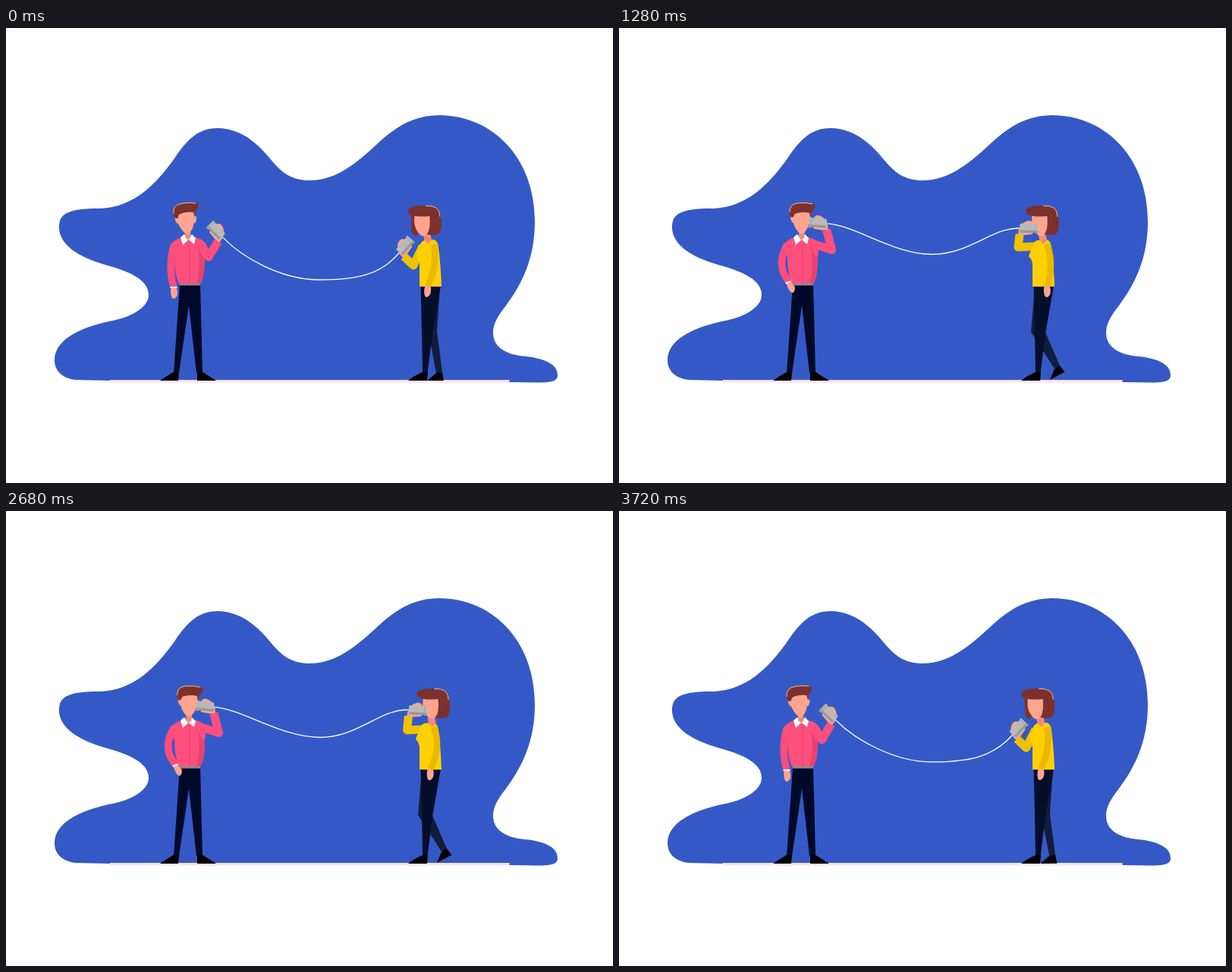
An HTML page for the animation above (3.76 s loop, 800 by 600 pixels).

```html
<!DOCTYPE html>
<html lang="en">
<head>
<meta charset="utf-8">
<title>Tin can telephone</title>
<style>
  html, body { margin: 0; width: 100%; height: 100%; overflow: hidden; background: #fff; }
  svg { display: block; width: 800px; height: 600px; }
  .skin { fill: #ffa48f; }
  .shade { fill: #f08a78; }
  .hair { fill: #7c312d; }
  .shine { fill: none; stroke: #f8cfc6; stroke-width: .9; }
  .pink { fill: #ff4f7d; }
  .yellow { fill: #ffd000; }
  .arm { fill: none; stroke-linejoin: round; }
</style>
</head>
<body>
<svg viewBox="0 0 800 600">
  <defs>
    <g id="can">
      <path class="skin" d="M-6 -5Q-5 -10 0 -10Q6 -9 9 -5L13 0L14 8L6 9L-5 8Z"/>
      <path fill="#b9b9b7" d="M-12 -6.5L-9 -6.5L-9 -6L11 -6Q13 0 11 6L-9 6L-9 7L-12 7Z"/>
      <path fill="#999996" d="M-12 3L12 2.5L11 6L-9 6L-9 7L-12 7Z"/>
      <path fill="none" stroke="#a5a5a2" d="M-9 -6V6"/>
    </g>
    <path id="hand" class="skin" d="M-3.5 0H3.5Q6 6 4.5 11Q1 17 -2 14Q-5 8 -3.5 0Z"/>
  </defs>

  <path fill="#3459c7" d="M70 260C71 240 95 238 125 238C168 236 197 207 222 172C239 146 255 132 278 132
    C315 132 338 160 352 177C365 192 378 201 400 201C435 201 462 178 488 154C512 131 537 115 571 115
    C640 115 697 170 697 255C697 305 679 339 659 366C648 380 642 390 642 402C642 422 661 431 684 433
    C712 436 727 444 727 458C727 466 718 467.5 700 467.5L664 467L137 465L92 464C74 462 64 452 64 438
    C64 412 95 396 135 387C170 381 188 366 188 352C188 332 163 321 130 312C95 302 68 285 70 260Z"/>
  <path fill="#ffe0ee" d="M137 464H663.5V467.5H137Z"/>

  <g id="man">
    <path fill="#000a28" d="M229 338H256L259 455H251L241 366L228 455H221Z"/>
    <path d="M221 453.5L228 454L227 465H203Q210 460 221 453.5ZM252 454L259 453.5Q269 460 277 465H252Z"/>
    <path id="manRestArm" class="arm" stroke="#fb4d7b" stroke-width="9.5"/>
    <g id="manRestHand"><use href="#hand"/><path fill="#fff" d="M-4.5 -1H4.500V1H-4.500Z"/></g>
    <path class="pink" d="M232 276Q219 279 215.500 290L222 302Q222 325 228 337.500H256Q262 328 262 302L264 285Q258 277 249 276Z"/>
    <path fill="#e54371" d="M253 287Q256 300 262 303Q262 328 256 337.500H251Q257 318 253 287Z"/>
    <path fill="none" stroke="#dc3d69" stroke-width=".8" d="M242 284V336"/>
    <path fill="#8e8790" d="M229 336.500H256V339.500H229Z"/>
    <path id="manArm" class="arm" stroke="#ff4f7d" stroke-width="11"/>
    <path fill="#fff" d="M230 276L235 272L240 279L245 272L250 277L248 285L240.500 279L233 286Z"/>
    <g id="manHead">
      <path class="shade" d="M235.500 264L243 264L243.500 276L240 280L236 276Z"/>
      <path class="skin" d="M227 249Q222 248 223 253Q225 259 228 258ZM247 248Q252 247 251 253Q250 258 246 258Z"/>
      <path class="skin" d="M226 242H248Q249 256 246 264Q242 272 238.500 272Q231 268 227 258Z"/>
      <path class="hair" d="M221 248Q217 233 231 231Q245 228 253 231Q255 238 250 241.500Q249 244 249 250L247 243Q236 242 228 246L226 251Q223 252 221 248Z"/>
      <path class="shine" d="M221 245Q219 234 231 231.500Q242 229.500 250 231"/>
    </g>
    <use id="manCan" href="#can"/>
  </g>

  <g id="woman">
    <path id="backLeg" fill="#101d3b"/>
    <path id="backShoe" d="M-4 0L4 -1L6 10H-16Z"/>
    <path fill="#060e2c" d="M546.500 340H573L562.500 400L555.500 455H549Q548 395 546.500 340Z"/>
    <path d="M548.500 454L556 453.500L555 465H530Q537 459 548.500 454Z"/>
    <path id="womanArm" class="arm" stroke="#efc200" stroke-width="11"/>
    <path class="yellow" d="M551 280Q545 283 545 290Q541 296 540 301Q545 306 545 313L545 341H574Q573 312 570 290Q570 282 564 279Z"/>
    <g id="womanRestHand"><use href="#hand"/></g>
    <path id="womanRestArm" class="arm" stroke="#e9b900" stroke-width="8.500"/>
    <path id="womanNeck" class="shade" d="M549 264H558L561 280L556 285L551 279Z"/>
    <g id="womanHead">
      <path id="strand" class="hair" d="M534 244H543V272L540 274Q534 272 534 262Z"/>
      <path class="hair" d="M545 240L556 234Q571 234 572.500 246Q576 262 571 271Q565 275 555 272Z"/>
      <path class="skin" d="M538.500 246H558Q560 262 556 270Q551 277 546 273Q539 266 538 256Z"/>
      <path class="hair" d="M530 240Q533 234 550 234Q570 233 573 248L558 248Q541 250 531 245.500Z"/>
      <path class="shine" d="M553 234.500Q572 233 572 249"/>
    </g>
    <use id="womanCan" href="#can"/>
  </g>
  <path id="string" fill="none" stroke="#fff" stroke-width="1.300"/>
</svg>

<script>
const LOOP = 3760, STEP = 40;

const mix = (a, b, k) => a + (b - a) * k;
const set = (id, attribute, value) => document.getElementById(id).setAttribute(attribute, value);
const place = (id, x, y, angle = 0, side = 1) =>
  set(id, 'transform', `translate(${x} ${y}) rotate(${angle}) scale(${side} 1)`);

function ease(t, from, to) {
  const u = Math.min(1, Math.max(0, (t - from) / (to - from)));
  return u * u * (3 - 2 * u);
}

// Draws a can with its arm; returns where the string is tied and its first handle.
// The wrist and the string stay fixed to the can.
function holdCan(who, side, x, y, angle, shoulder, elbow) {
  const rad = angle * Math.PI / 180, cos = Math.cos(rad), sin = Math.sin(rad);
  const onCan = (along, across) =>
    [x + side * along * cos - across * sin, y + side * along * sin + across * cos];
  place(who + 'Can', x, y, angle, side);
  set(who + 'Arm', 'd', `M${shoulder}L${elbow}L${onCan(12, 8)}`);
  return { knot: onCan(13, 0), handle: onCan(50, 0) };
}

function restArm(who, shoulder, bend, x, y, angle) {
  set(who + 'RestArm', 'd', `M${shoulder}Q${bend} ${x} ${y}`);
  place(who + 'RestHand', x, y, angle);
}

function drawBackLeg(lift) {
  const knee = mix(562.5, 552, lift), half = mix(5.5, 9, lift);
  const ankleX = mix(571, 577.5, lift), ankleY = mix(455, 447.5, lift);
  set('backLeg', 'd', `M548 342H572L${knee + half} 399L${ankleX + 4} ${ankleY - lift}`
    + `L${ankleX - 4} ${ankleY + lift}L${knee - half} 401Z`);
  place('backShoe', ankleX, ankleY, -28 * lift);
}

function drawString(a, b, lift) {
  const lowX = (a.knot[0] + b.knot[0]) / 2 + 11, lowY = mix(332, 298.5, lift);
  set('string', 'd', `M${a.knot}C${a.handle} ${lowX - 50} ${lowY} ${lowX} ${lowY}`
    + `C${lowX + 50} ${lowY} ${b.handle} ${b.knot}`);
}

function draw(t) {
  const stay = 1 - ease(t, 3040, 3800);
  const lift = ease(t, 400, 1200) * stay;
  const nod = ease(t, 1760, 2400) - ease(t, 2400, 3040);
  const turn = ease(t, 2400, 3040) * stay;
  const lean = ease(t, 1400, 3040) * stay;

  // The man's can follows his head while he listens
  const sway = 7 * turn - 3 * nod;
  set('manHead', 'transform', `rotate(${5.5 * lift + sway} 241 285)`);
  const manEnd = holdCan('man', 1,
    mix(277, 262, lift) + sway * .45, mix(267, 257, lift) + sway * .4, mix(46, 4, lift) + sway,
    [257, 285], [mix(267, 280.5, lift), mix(302, 292.5, lift)]);
  restArm('man', [222, 285], [mix(213, 206, lift) - 3 * nod, 313],
    mix(221, 224, lift), mix(342, 335, lift), -20 * lift);

  const shift = 6 * lift + 6 * lean;
  place('womanHead', shift, 0);
  place('womanNeck', shift / 2, 0);
  place('strand', 8 * lift, 0);
  const womanEnd = holdCan('woman', -1,
    mix(526, 540, lift) + 3 * lean, mix(287, 264, lift) - 1.5 * lean, mix(-50, 0, lift) + 2 * lean,
    [549, 288], [mix(537, 526, lift) + 3 * lean, mix(313, 289, lift)]);
  const swing = lift - nod;
  restArm('woman', [564, 285], [mix(569, 574, lift), 313], mix(556, 564, swing), 340, 8 - 6 * swing);
  drawBackLeg(lift);

  drawString(manEnd, womanEnd, lift);
}

let origin;
function tick(now) {
  origin ??= now;
  draw(Math.floor((now - origin) % LOOP / STEP) * STEP);
  requestAnimationFrame(tick);
}
draw(0);
requestAnimationFrame(tick);
</script>
</body>
</html>
```
